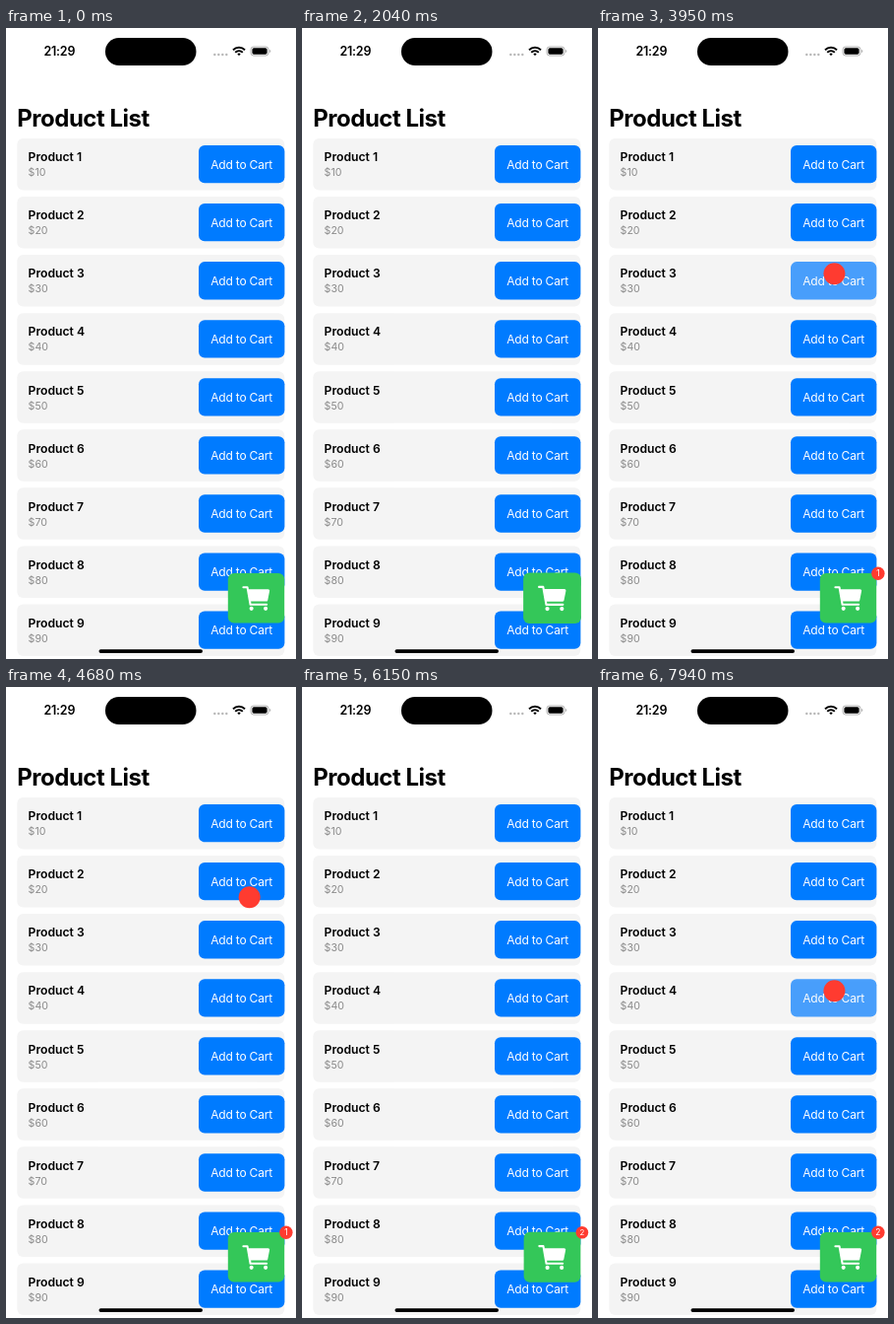
Animation of 295 by 640 pixels, one loop 8000 ms. Source, as an HTML page:

```html
<!DOCTYPE html>
<html lang="en">
<head>
<meta charset="utf-8">
<title>Product List</title>
<style>
  html, body { margin: 0; width: 100%; height: 100%; overflow: hidden; background: #fff; }
  svg { display: block; width: 295px; height: 640px; font-family: Inter, sans-serif; }
  .title { font-size: 24px; font-weight: 700; letter-spacing: -.5px; }
  .name { font-size: 12.2px; font-weight: 600; }
  .price { font-size: 10.6px; fill: #8a8a8a; }
  .label { font-size: 12px; letter-spacing: -.2px; fill: #fff; text-anchor: middle; }
  .clock { font-size: 12.5px; font-weight: 600; letter-spacing: -.2px; text-anchor: middle; }
  .count { font-size: 8.5px; fill: #fff; text-anchor: middle; }
</style>
</head>
<body>
<svg viewBox="0 0 295 640">
  <text class="clock" x="54.3" y="28">21:29</text>
  <rect x="101" y="10" width="92.5" height="28" rx="14"/>
  <g fill="#b8b8b8">
    <circle cx="212.3" cy="27" r="1.2"/><circle cx="216.3" cy="27" r="1.2"/>
    <circle cx="220.3" cy="27" r="1.2"/><circle cx="224.3" cy="27" r="1.2"/>
  </g>
  <g fill="none" stroke="#000" stroke-width="1.9">
    <path d="M231 22.2a8.6 8.6 0 0 1 12 0M233.2 24.8a5.5 5.5 0 0 1 7.6 0"/>
    <path d="M235.3 26.3L237 28.3L238.7 26.3A2.6 2.6 0 0 0 235.3 26.3z" fill="#000" stroke="none"/>
  </g>
  <rect x="249" y="19" width="18" height="9" rx="2.8" fill="none" stroke="#a8a8a8" stroke-width=".9"/>
  <rect x="250.4" y="20.3" width="15.2" height="6.4" rx="1.7"/>
  <path d="M268.2 22v3a1.6 1.6 0 0 0 0-3z" fill="#a8a8a8"/>

  <text class="title" x="11.3" y="99.7">Product List</text>
  <g id="list"></g>

  <g id="cart">
    <rect x="225.8" y="553" width="57.4" height="50.5" rx="6" fill="#34c759"/>
    <g transform="translate(238.3 562) scale(.0645)" fill="#fff">
      <path d="M457 121a24 24 0 0 0-19-9H134l-6-35a16 16 0 0 0-16-13H48a16 16 0 0 0 0 32h51l45 259a16 16 0 0 0 16 13h256a16 16 0 0 0 0-32H173l-5-32h241a24 24 0 0 0 24-19l29-144a24 24 0 0 0-5-20z"/>
      <circle cx="176" cy="416" r="32"/><circle cx="400" cy="416" r="32"/>
    </g>
  </g>
  <g id="badge">
    <circle r="6.7" fill="#ff3b30"/>
    <text class="count" id="count" y="3.1"></text>
  </g>
  <circle id="ball" r="11" fill="#ff3b30"/>
  <rect x="94.5" y="630.2" width="105.5" height="3.8" rx="1.9"/>
</svg>
<script>
const LOOP = 8000, PITCH = 59.06;
const RISE = 73, HALF_FLIGHT = 750, FLIGHT = 2 * HALF_FLIGHT;
const GROW = 200, BADGE_DELAY = 400, BADGE_GROW = 150;
const CART = { x: 254.5, y: 578.2 };
const START_X = 239.7;
// Launch time of each ball and the row it leaves from
const taps = [{ at: 501, row: 1 }, { at: 3785, row: 2 }, { at: 7775, row: 3 }];

const byId = id => document.getElementById(id);
const [list, cart, badge, count, ball] = ['list', 'cart', 'badge', 'count', 'ball'].map(byId);

list.innerHTML = Array.from({ length: 9 }, (_, i) => `
  <g transform="translate(0 ${i * PITCH})">
    <rect x="11.3" y="112" width="272" height="52.5" rx="6" fill="#f4f4f4"/>
    <text class="name" x="22.6" y="135.3">Product ${i + 1}</text>
    <text class="price" x="22.6" y="150.3">$${i + 1}0</text>
    <g class="button">
      <rect x="196" y="119" width="87.4" height="38.3" rx="6" fill="#007bff"/>
      <text class="label" x="239.6" y="142.7">Add to Cart</text>
    </g>
  </g>`).join('');
const buttons = list.querySelectorAll('.button');

const ease = (time, duration) => {
  const p = Math.min(1, Math.max(0, time / duration));
  return p < .5 ? 2 * p * p : 1 - 2 * (1 - p) ** 2;
};
const mix = (a, b, p) => a + (b - a) * p;

// Damped spring going from 1 to 0
const spring = ms => {
  const s = ms / 1000;
  return Math.exp(-5 * s) * (Math.cos(8.66 * s) + .577 * Math.sin(8.66 * s));
};
const pop = (ms, grow) => ms < 0 ? 0 : ms < grow ? ease(ms, grow) : spring(ms - grow);

function placeBall({ row }, ms) {
  const startY = 138.2 + row * PITCH, topY = startY - RISE;
  const up = ease(ms, HALF_FLIGHT), down = ease(ms - HALF_FLIGHT, HALF_FLIGHT);
  ball.setAttribute('cx', mix(START_X, CART.x, (up + down) / 2));
  ball.setAttribute('cy', down > 0 ? mix(topY, CART.y, down) : mix(startY, topY, up));
}

function draw(t) {
  let cartScale = 1, badgeScale = 1, items = 0, flying = false;
  for (const tap of taps) {
    const ms = t - tap.at, landed = ms - FLIGHT;
    buttons[tap.row].setAttribute('opacity', 1 - .3 * (ease(ms + 65, 150) - ease(ms - 170, 250)));
    if (ms >= 0 && landed < 0) {
      flying = true;
      placeBall(tap, ms);
    }
    cartScale += .3 * pop(landed, GROW);
    if (landed >= BADGE_DELAY) {
      items++;
      if (items > 1) badgeScale += .4 * pop(landed - BADGE_DELAY, BADGE_GROW);
    }
  }
  ball.setAttribute('visibility', flying ? 'visible' : 'hidden');
  cart.setAttribute('transform',
    `translate(${CART.x} ${CART.y}) scale(${cartScale}) translate(${-CART.x} ${-CART.y})`);
  badge.setAttribute('visibility', items ? 'visible' : 'hidden');
  badge.setAttribute('transform', `translate(284.9 553.3) scale(${badgeScale})`);
  count.textContent = items || '';
}

const begin = performance.now();
function frame() {
  draw((performance.now() - begin) % LOOP);
  requestAnimationFrame(frame);
}
frame();
</script>
</body>
</html>
```
